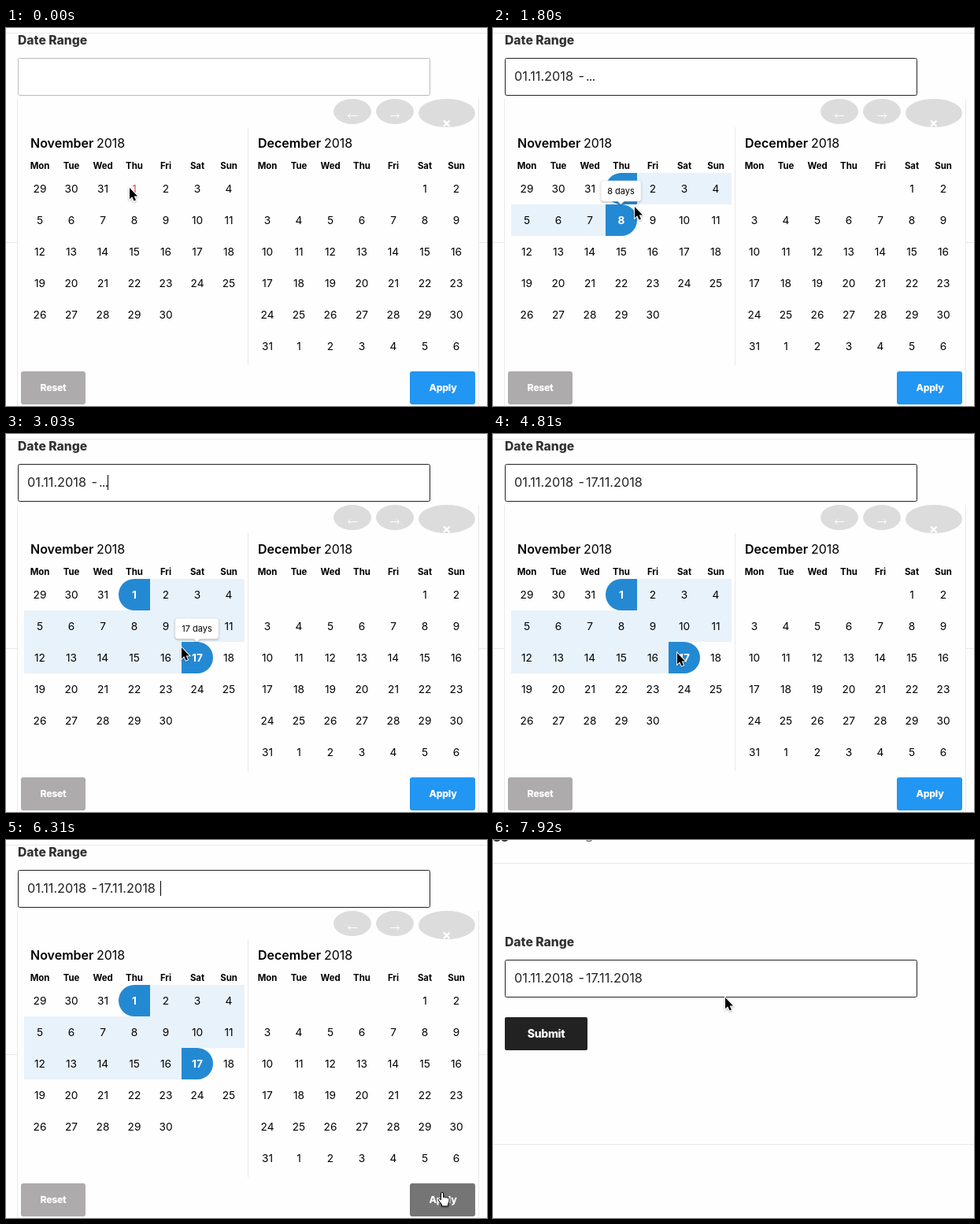
Write an HTML page that moves like this. It is 611x480 px and loops after 8000 ms.

```html
<!DOCTYPE html>
<html lang="en">
<head>
<meta charset="utf-8">
<title>Date range picker</title>
<style>
  html, body { margin: 0; width: 100%; height: 100%; overflow: hidden; background: #fefefe; }
  svg { display: block; width: 611px; height: 480px; font-family: Inter, "Open Sans", sans-serif; }
  .line { stroke: #e9e9e9; fill: none; }
  .label { font-size: 15.7px; font-weight: 800; fill: #333; }
  .value { font-size: 16.3px; fill: #222; }
  .month { font-size: 16px; }
  .month tspan { font-weight: 600; }
  .weekday { font-size: 11.4px; font-weight: 700; text-anchor: middle; }
  .day { font-size: 13.7px; text-anchor: middle; }
  .day.hover { fill: #e0513f; }
  .day.end { fill: #fff; font-weight: 700; }
  .button { font-size: 12.3px; font-weight: 800; letter-spacing: -.3px; fill: #fff; text-anchor: middle; }
  .icon { stroke: #fff; fill: none; }
</style>
</head>
<body>
<svg viewBox="0 0 611 480">
  <defs>
    <filter id="shadow" x="-40%" y="-40%" width="180%" height="200%">
      <feDropShadow dx="0" dy="1" stdDeviation="1" flood-opacity=".35"/>
    </filter>
    <clipPath id="belowTitle"><path d="M0 157H611V480H0z"/></clipPath>
  </defs>
  <rect width="611" height="480" fill="#fefefe"/>

  <g id="closedPage">
    <path class="line" d="M0 29.5H611M0 386.5H611"/>
    <text class="label" x="0" y="-1">gg</text>
    <text class="value" x="117" y="-1" fill-opacity=".7">g</text>
    <rect x="15" y="225" width="105" height="42" rx="2" fill="#222"/>
    <text class="button" x="67.5" y="251" style="font-size:14px">Submit</text>
  </g>

  <g id="field">
    <text class="label" x="15" y="21">Date Range</text>
    <rect id="box" x="15.5" y="38.5" width="523" height="47" rx="2" fill="#fff"/>
    <g id="dates" class="value">
      <text x="27" y="67">01.11.2018</text>
      <text x="108.5" y="67">-</text>
      <text id="lastDate" x="118" y="67"></text>
    </g>
    <rect id="caret" y="52" width="1" height="19"/>
  </g>

  <g id="picker">
    <path class="line" d="M0 6.5H611M0 272.5H14M601 272.5H611"/>
    <path class="line" d="M14.5 90V480M600.5 90V480M307.5 126V428"/>
    <g fill="#dcdcdc">
      <ellipse cx="440" cy="106" rx="24" ry="16"/>
      <ellipse cx="494" cy="106" rx="24" ry="16"/>
      <ellipse cx="560" cy="108" rx="36" ry="18"/>
    </g>
    <path class="icon" d="M446 111.5H434.5M437.5 108.5l-3 3 3 3M488 111.5H499.5M496.5 108.5l3 3-3 3"/>
    <path class="icon" stroke-width="2.4" d="M556 117.5l7.5 7.5M563.5 117.5l-7.5 7.5"/>
    <path id="band" fill="#e8f2fa"/>
    <path id="ends" fill="#2489d3"/>
    <g id="months"></g>
    <rect x="19" y="436" width="82" height="42" rx="3" fill="#adabab"/>
    <text class="button" x="60" y="461">Reset</text>
    <rect id="apply" x="513" y="436" width="83" height="42" rx="3"/>
    <text class="button" x="555" y="461">Apply</text>
    <g clip-path="url(#belowTitle)">
      <g id="tip">
        <path id="tipBox" fill="#fff" stroke="#ddd" stroke-width=".5" filter="url(#shadow)"/>
        <text id="tipText" y="17" font-size="11" text-anchor="middle"></text>
      </g>
    </g>
  </g>

  <g id="cursor" filter="url(#shadow)">
    <path id="arrow" d="M0 0V14.3L3.2 11.3 5.6 16.6 8 15.5 5.6 10.4H10z" stroke="#fff" paint-order="stroke" stroke-width="1.8"/>
    <path id="hand" fill="#fff" stroke="#000" transform="translate(-4)"
      d="M4.5 10V2a1.5 1.5 0 0 1 3 0v5a1.4 1.4 0 0 1 2.7.3a1.4 1.4 0 0 1 2.6.4a1.3 1.3 0 0 1 2.2 1v3.3l-1.5 3.5v2.5h-8v-2l-4-5.5a1.4 1.4 0 0 1 2.2-1.6z"/>
  </g>
</svg>
<script>
const LOOP = 8000, TICK = LOOP / 90, CELL = 40, TOP = 184, LEFT = 23, FIRST = 3;
const WEEKDAYS = ['Mon', 'Tue', 'Wed', 'Thu', 'Fri', 'Sat', 'Sun'];
const $ = id => document.getElementById(id);
const show = (id, on) => { $(id).style.display = on ? '' : 'none'; };
const set = (id, name, value) => $(id).setAttribute(name, value);

const CARET_FLIPS = [180, 630, 1080, 1530, 1970, 2490, 3030, 3560, 4090,
  4810, 5250, 5780, 6310, 6760, 7300, 7830];
// [time, last selected day]
const SELECTION = [[0, 0], [1080, 1], [1790, 8], [1880, 9], [2320, 17]];
// [start tick, end tick, from, to]
const MOVES = [
  [16, 26, [157, 203], [223, 271]],
  [41, 46, [223, 271], [234, 278]],
  [55, 65, [234, 278], [553, 448]],
  [65, 66, [553, 448], [552, 447]],
  [82, 89, [552, 447], [295, 200]]
];

function monthMarkup(name, left, before, count, after) {
  const text = (cls, i, y, label) =>
    `<text class="${cls}" x="${left + CELL / 2 + (i % 7) * CELL}" y="${y}">${label}</text>`;
  const days = [...before, ...Array.from({ length: count }, (_, i) => i + 1),
    ...Array.from({ length: after }, (_, i) => i + 1)];
  return `<text class="month" x="${left + 8}" y="152"><tspan>${name}</tspan></text>` +
    `<text class="month" x="${left + 92}" y="152">2018</text>` +
    WEEKDAYS.map((d, i) => text('weekday', i, 179, d)).join('') +
    days.map((d, i) => text('day', i, TOP + 25 + Math.floor(i / 7) * CELL, d)).join('');
}
$('months').innerHTML = monthMarkup('November', LEFT, [29, 30, 31], 30, 0) +
  monthMarkup('December', 312, Array(5).fill(''), 31, 6);
const dayTexts = [...document.querySelectorAll('.day')].slice(FIRST, FIRST + 30);

function cellAt(day) {
  const i = day - 1 + FIRST;
  return { x: LEFT + (i % 7) * CELL, y: TOP + Math.floor(i / 7) * CELL };
}

function drawSelection(last, hovered) {
  dayTexts.forEach((el, i) => {
    const end = last && (i === 0 || i === last - 1);
    el.setAttribute('class', 'day' + (end ? ' end' : i === 0 && hovered ? ' hover' : ''));
  });
  let band = '', ends = '';
  if (last === 1) {
    ends = 'M163 184a20 20 0 0 0 0 40a20 20 0 0 0 0-40z';
  } else if (last) {
    const a = cellAt(1), b = cellAt(last);
    for (let y = a.y; y <= b.y; y += CELL) {
      const from = y === a.y ? a.x + CELL : LEFT;
      const to = y === b.y ? b.x : LEFT + 7 * CELL;
      band += `M${from} ${y}H${to}v40H${from}z`;
    }
    ends = `M${a.x + CELL} ${a.y}h-20a20 20 0 0 0 0 40h20z` +
      `M${b.x} ${b.y}h20a20 20 0 0 1 0 40h-20z`;
  }
  set('band', 'd', band);
  set('ends', 'd', ends);
}

function drawTip(last) {
  const { x, y } = cellAt(last);
  const half = last === 1 ? 21.5 : last < 10 ? 25.5 : 27.5;
  set('tip', 'transform', `translate(${x + 19.5} ${y - 30})`);
  set('tipBox', 'd', `M${-half + 3} 0H${half - 3}q3 0 3 3V23q0 3-3 3H4l-4 4-4-4H${-half + 3}q-3 0-3-3V3q0-3 3-3z`);
  $('tipText').textContent = last === 1 ? '1 day' : last + ' days';
}

function cursorAt(tick) {
  let [x, y] = MOVES[0][2];
  for (const [start, end, from, to] of MOVES) {
    if (tick < start) break;
    const u = Math.min(1, (tick - start) / (end - start));
    const s = u * u * (3 - 2 * u);
    [x, y] = from.map((v, i) => v + (to[i] - v) * s);
  }
  return [Math.round(x), Math.round(y)];
}

function draw(t) {
  const open = t < 6490, complete = t >= 4270;
  const last = SELECTION.filter(([at]) => at <= t).pop()[1];
  const [x, y] = cursorAt(Math.floor(t / TICK));
  const overApply = open && x >= 513 && y >= 436;

  show('picker', open);
  show('closedPage', !open);
  set('field', 'transform', `translate(0 ${open ? 0 : 114})`);
  set('box', 'stroke', t < 180 ? '#bbb' : '#222');

  show('dates', last > 0);
  $('lastDate').textContent = complete ? '17.11.2018' : '...';
  $('lastDate').style.letterSpacing = complete ? '' : '-.9px';
  set('caret', 'x', complete ? 196 : last ? 129 : 27);
  show('caret', CARET_FLIPS.filter(at => at <= t).length % 2 === 1);

  drawSelection(last, t < 1080);
  show('tip', last > 0 && !complete);
  if (last) drawTip(last);
  set('apply', 'fill', overApply ? '#757575' : '#2196f3');

  set('cursor', 'transform', `translate(${x} ${y})`);
  show('arrow', !overApply);
  show('hand', overApply);
}

let origin;
function frame(now) {
  origin ??= now;
  draw((now - origin) % LOOP);
  requestAnimationFrame(frame);
}
draw(0);
requestAnimationFrame(frame);
</script>
</body>
</html>
```
